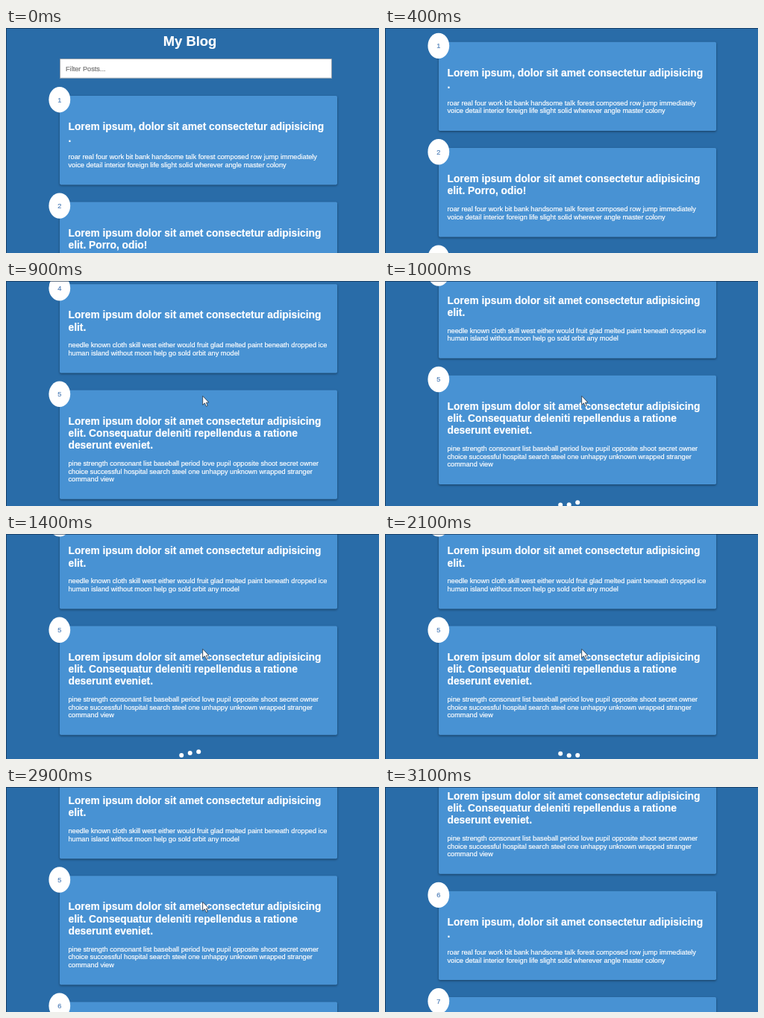
An HTML page with a canvas that plays this animation: 500x302 px, repeating every 4000 ms.

```html
<!DOCTYPE html>
<html lang="en">
<head>
<meta charset="utf-8">
<title>My Blog</title>
<style>
  html, body { margin: 0; width: 100%; height: 100%; overflow: hidden; background: #296ca8; }
  canvas { display: block; width: 500px; height: 302px; }
</style>
</head>
<body>
<canvas id="stage" width="500" height="302"></canvas>
<script>
const ctx = document.getElementById('stage').getContext('2d');
const WIDTH = 500, HEIGHT = 302, LOOP = 4000, TICK = 100;
const FONT = '"Liberation Sans", Arial, sans-serif';
const BLUE = '#296ca8', CARD_BLUE = '#4892d3';
const CARD = { x: 72, width: 372, gap: 23, textX: 83.5, titleLine: 16.2, bodyLine: 10.6 };

const LOREM = 'Lorem ipsum dolor sit amet consectetur adipisicing';
const FIRST = {
  title: ['Lorem ipsum, dolor sit amet consectetur adipisicing', '.'],
  body: ['roar real four work bit bank handsome talk forest composed row jump immediately',
         'voice detail interior foreign life slight solid wherever angle master colony']
};
const SHORT = {
  title: [LOREM, 'elit.'],
  body: ['needle known cloth skill west either would fruit glad melted paint beneath dropped ice',
         'human island without moon help go sold orbit any model']
};
const LONG = {
  title: [LOREM, 'elit. Consequatur deleniti repellendus a ratione', 'deserunt eveniet.'],
  body: ['pine strength consonant list baseball period love pupil opposite shoot secret owner',
         'choice successful hospital search steel one unhappy unknown wrapped stranger',
         'command view']
};
const SECOND = { title: [LOREM, 'elit. Porro, odio!'], body: FIRST.body };

let nextTop = 91;
const posts = [FIRST, SECOND, SHORT, SHORT, LONG, FIRST, SECOND].map((post, i) => {
  const height = 65.8 + post.title.length * CARD.titleLine + post.body.length * CARD.bodyLine;
  const placed = { ...post, number: i + 1, top: nextTop, height };
  nextTop += height + CARD.gap;
  return placed;
});

// Each smooth scroll: start time and distance.
const SCROLLS = [[345, 509.3], [840, 27.7], [2875, 153.1]];
const SCROLL_TIME = 210;
const LOADER_Y = 835, LOADER_SHOWN = 900, LOADER_HIDING = 2300, POSTS_LOADED = 2900;

const clamp = v => Math.max(0, Math.min(1, v));

// CSS-style timing curve through control points (x1, 0) and (x2, 1 or y2).
function bezier(x1, y1, x2, y2) {
  const curve = (a, b, u) => 3 * a * u * (1 - u) ** 2 + 3 * b * u * u * (1 - u) + u ** 3;
  return x => {
    let low = 0, high = 1;
    for (let i = 0; i < 20; i++) {
      const mid = (low + high) / 2;
      if (curve(x1, x2, mid) < x) low = mid; else high = mid;
    }
    return curve(y1, y2, low);
  };
}
const easeIn = bezier(0.42, 0, 1, 1);
const easeInOut = bezier(0.42, 0, 0.58, 1);

function scrollAt(t) {
  return SCROLLS.reduce((sum, [start, distance]) =>
    sum + distance * easeInOut(clamp((t - start) / SCROLL_TIME)), 0);
}

function text(str, x, y, size, { color = '#fff', weight = 'normal', align = 'left' } = {}) {
  ctx.font = `${weight} ${size}px ${FONT}`;
  ctx.fillStyle = ctx.strokeStyle = color;
  ctx.textAlign = align;
  ctx.fillText(str, x, y);
  ctx.lineWidth = 0.2;
  ctx.strokeText(str, x, y);
}

function ellipse(x, y, rx, ry) {
  ctx.beginPath();
  ctx.ellipse(x, y, rx, ry, 0, 0, Math.PI * 2);
  ctx.fill();
}

function drawHeader() {
  text('My Blog', 246.5, 24.3, 18.4, { weight: 'bold', align: 'center' });
  ctx.fillStyle = '#fff';
  ctx.fillRect(72, 41, 365, 26.5);
  ctx.strokeStyle = '#7c8a99';
  ctx.lineWidth = 0.8;
  ctx.strokeRect(72.4, 41.4, 364.2, 25.8);
  text('Filter Posts...', 80, 57.6, 9.2, { color: '#757575' });
}

function drawPost({ title, body, number, top, height }) {
  ctx.save();
  ctx.shadowColor = 'rgba(0, 0, 0, 0.4)';
  ctx.shadowOffsetY = 1.2;
  ctx.shadowBlur = 3;
  ctx.fillStyle = CARD_BLUE;
  ctx.beginPath();
  ctx.roundRect(CARD.x, top, CARD.width, height, 1.8);
  ctx.fill();
  ctx.restore();

  ctx.fillStyle = '#fff';
  ellipse(71.8, top + 5.2, 14.4, 17.2);
  text(number, 71.8, top + 8.6, 9.2, { color: '#4f7fb8', align: 'center' });

  const titleY = top + 46.2;
  title.forEach((line, i) =>
    text(line, CARD.textX, titleY + i * CARD.titleLine, 13.8, { weight: 'bold' }));
  const bodyY = titleY + title.length * CARD.titleLine + 6.6;
  body.forEach((line, i) => text(line, CARD.textX, bodyY + i * CARD.bodyLine, 9.2));
}

// Up and down again in 500 ms, easing into each half.
function bounce(t) {
  const phase = ((t + 75) % 500) / 250;
  return 5.75 * (phase < 1 ? easeIn(phase) : 1 - easeIn(phase - 1));
}

function drawLoader(t) {
  ctx.globalAlpha = 1 - easeIn(clamp((t - LOADER_HIDING) / 300));
  ctx.fillStyle = '#fff';
  for (let i = 0; i < 3; i++) {
    ellipse(235.2 + i * 11.5, LOADER_Y - bounce(t - i * 100), 3, 3);
  }
  ctx.globalAlpha = 1;
}

function drawCursor(x, y) {
  ctx.beginPath();
  [[0, 0], [0, 12], [2.7, 9.5], [4.7, 14], [6.6, 13.1], [4.7, 8.9], [8.2, 8.6]]
    .forEach(([dx, dy]) => ctx.lineTo(x + dx, y + dy));
  ctx.closePath();
  ctx.fillStyle = '#fff';
  ctx.fill();
  ctx.strokeStyle = '#23303f';
  ctx.lineWidth = 0.8;
  ctx.stroke();
}

function draw(t) {
  const loaded = t >= POSTS_LOADED;
  ctx.fillStyle = BLUE;
  ctx.fillRect(0, 0, WIDTH, HEIGHT);

  ctx.save();
  ctx.translate(0, -scrollAt(t));
  drawHeader();
  posts.slice(0, loaded ? 7 : 5).forEach(drawPost);
  if (t >= LOADER_SHOWN && !loaded) drawLoader(t);
  ctx.restore();

  if (t >= 600 && t < 3100) drawCursor(263.7, 154.3);

  ctx.fillStyle = 'rgba(10, 35, 65, 0.6)';
  ctx.fillRect(0, 0, WIDTH, 1);
  ctx.fillRect(0, 1, 1, HEIGHT);
}

// The picture is a ten-per-second recording, so time advances in ticks.
const start = performance.now();
function frame() {
  const t = (performance.now() - start) % LOOP;
  draw(Math.floor(t / TICK) * TICK);
  requestAnimationFrame(frame);
}
frame();
</script>
</body>
</html>
```
